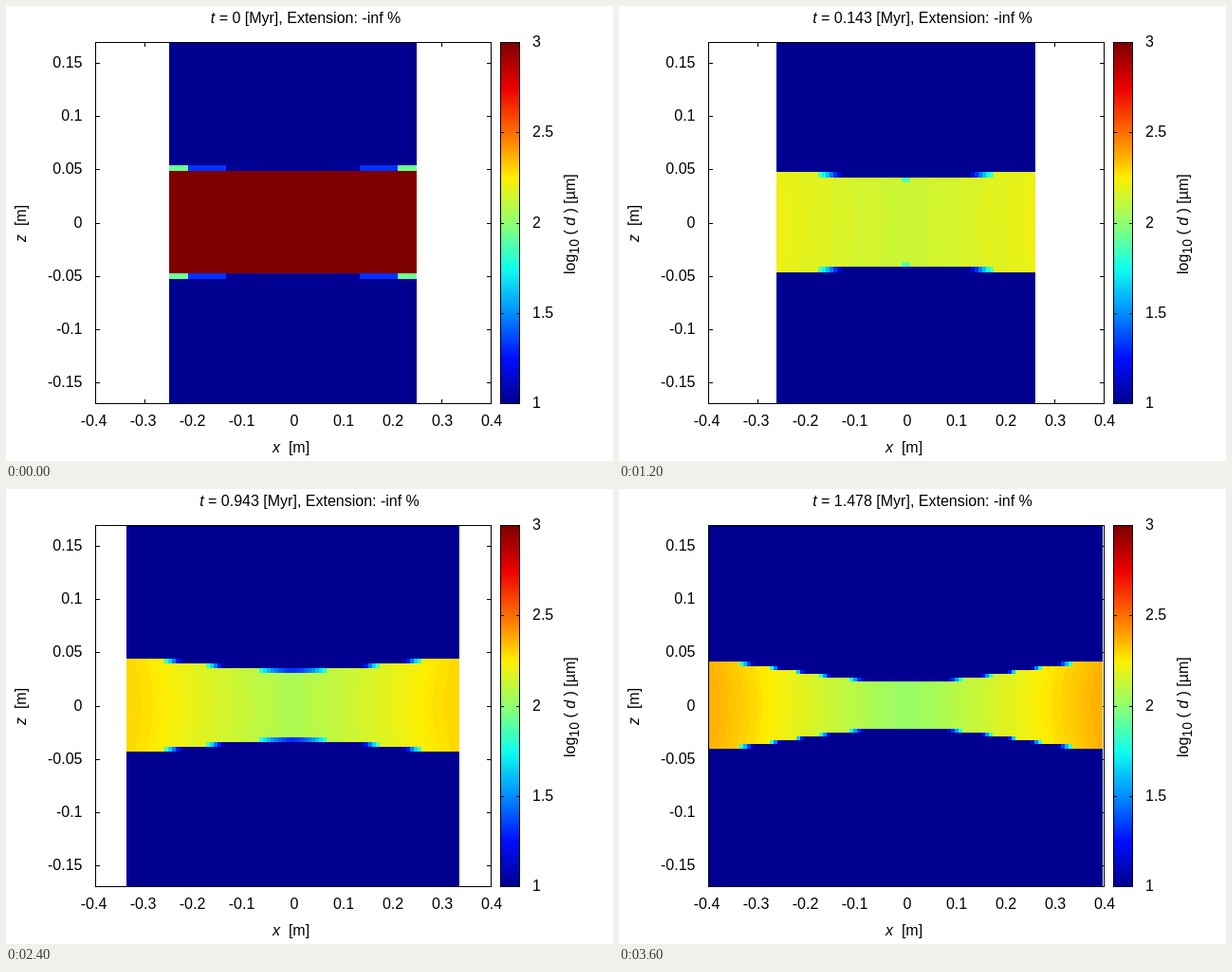
An HTML page for the animation above (4000 ms loop, 640x480 px).

```html
<!DOCTYPE html>
<html lang="en">
<head>
<meta charset="utf-8">
<title>Layer extension</title>
<style>
  html, body { margin: 0; width: 100%; height: 100%; overflow: hidden; background: #fff; }
  svg { display: block; width: 640px; height: 480px; }
  text { font: 16px "Liberation Sans", Arial, sans-serif; fill: #000; white-space: pre; }
  .it { font-style: italic; }
  .sub { font-size: 14px; }
  .line { fill: none; stroke: #000; stroke-width: 1; }
</style>
</head>
<body>
<svg viewBox="0 0 640 480">
  <g id="axes"></g>
  <g id="model" transform="translate(302.5 228)" shape-rendering="crispEdges"></g>
  <rect class="line" x="94.5" y="38.5" width="417" height="381"/>
  <g id="bar" shape-rendering="crispEdges"></g>
  <g id="barTicks"></g>
  <text id="title" y="18" text-anchor="middle"><tspan class="it">t</tspan><tspan id="clock"></tspan></text>
  <text x="281" y="471"><tspan class="it">x</tspan>&#160; [m]</text>
  <text transform="translate(21 249) rotate(-90)"><tspan class="it">z</tspan>&#160; [m]</text>
  <text transform="translate(600 283) rotate(-90)">log<tspan class="sub" dy="4">10</tspan><tspan dy="-4"> ( </tspan><tspan class="it">d</tspan> ) [µm]</text>
</svg>
<script>
const $ = id => document.getElementById(id);
const STEP_MS = 400;
const TIMES = [0, 0.002, 0.016, 0.143, 0.447, 0.715, 0.943, 1.143, 1.32, 1.478];
const HALF_WIDTH = 130.5, HALF_HEIGHT = 54, ROW = 6, COLUMN = 4;
const STRAIN_RATE = 0.3138;
const TOP = -189, BOTTOM = 191;

// Colour scale from 1 to 3, in 128 levels
const STOPS = ["000090", "000fff", "0090ff", "0fffee", "90ff70", "ffee00", "ff7000", "ee0000", "7f0000"]
  .map(hex => [0, 2, 4].map(i => parseInt(hex.slice(i, i + 2), 16)));

function color(value) {
  const level = Math.max(0, Math.min(127, Math.floor((value - 1) * 64)));
  const pos = level / 127 * 8;
  const i = Math.min(7, Math.floor(pos));
  return `rgb(${STOPS[i].map((c, k) => Math.round(c + (STOPS[i + 1][k] - c) * (pos - i)))})`;
}

const box = (x, y, w, h, fill) =>
  `<rect x="${x}" y="${y}" width="${w}" height="${h}" fill="${fill}"/>`;
const line = (x1, y1, x2, y2) => `<path class="line" d="M${x1} ${y1}L${x2} ${y2}"/>`;
const label = (x, y, anchor, str) => `<text x="${x}" y="${y}" text-anchor="${anchor}">${str}</text>`;
const crisp = v => Math.floor(v) + 0.5;

// One cell repeated in all four quadrants
function mirrored(inner, outer, low, high, fill) {
  let out = "";
  for (const x of [-outer, inner])
    for (const y of [-high, low]) out += box(x, y, outer - inner, high - low, fill);
  return out;
}

// Nested bands whose sides bow towards the centre
function bands(half, height, centre, spread) {
  let out = "", last = "";
  for (let d = half; d > 0; d -= COLUMN) {
    const fill = color(centre + spread * (d / half) ** 1.3);
    if (fill === last) continue;
    last = fill;
    const waist = d === half ? d : d - Math.min(16, d / 2);
    out += `<path fill="${fill}" d="M${-d} ${-height}Q${-waist} 0 ${-d} ${height}H${d}Q${waist} 0 ${d} ${-height}Z"/>`;
  }
  return out;
}

// Coarse cells along the undeformed layer, fading towards the centre
function rim(half, relax) {
  let out = "", outer = half;
  for (const inner of [110.5, 70.5, 37.5]) {
    const value = 1 + (0.75 + 0.18 * relax) * (outer / half) ** 6.5;
    out += mirrored(inner, outer, HALF_HEIGHT, HALF_HEIGHT + ROW, color(value));
    outer = inner;
  }
  return out;
}

// Rows eaten away by the neck; a partly eaten cell fades to the matrix colour
function neck(half, stretch, height) {
  const row = n => Math.round(height - n * ROW * stretch ** -0.75);
  const depth = 1.35 + 1.2 * (stretch - 1) + 9.5 * Math.max(0, stretch - 1.25);
  let out = "";
  for (let outer = half; outer > 0; outer -= COLUMN) {
    const inner = Math.max(0, outer - COLUMN);
    const eaten = depth * (1 - (outer / half) ** 2) ** 2;
    const n = Math.floor(eaten);
    const fade = (eaten - n - 0.4) / 0.4;
    if (n > 0) out += mirrored(inner, outer, row(n), row(0), color(1));
    if (fade > 0) out += mirrored(inner, outer, row(n + 1), row(n), color(1.9 - 0.9 * fade));
  }
  return out;
}

function drawModel(index) {
  const time = TIMES[index];
  const stretch = Math.exp(STRAIN_RATE * time);
  const half = crisp(HALF_WIDTH * stretch - 0.25);
  const height = HALF_HEIGHT * stretch ** -0.36;
  const relax = 2 ** (-time / 0.002);
  const centre = 2.14 - 0.21 * (stretch - 1) + 0.86 * relax;
  const spread = (0.05 + 0.51 * (stretch - 1)) * (1 - relax);
  const deformed = half > HALF_WIDTH;

  $("model").innerHTML = box(-half, TOP, 2 * half, BOTTOM - TOP, color(1)) +
    bands(half, Math.round(height), centre, spread) +
    (deformed ? neck(half, stretch, height) : rim(half, relax));
  $("clock").textContent = ` = ${time && time.toFixed(3)} [Myr], Extension: -inf %`;
  $("title").setAttribute("x", time ? 320 : 316);
}

function drawAxes() {
  let axes = "", bar = "", ticks = "";
  for (let i = 0; i <= 8; i++) {
    const x = crisp(94.5 + i * 417 / 8);
    axes += line(x, 419, x, 415) + line(x, 39, x, 43);
    axes += label(x + (i < 4 ? -2 : 0.5), 443, "middle", (i - 4) / 10);
  }
  for (let i = -3; i <= 3; i++) {
    const y = crisp(229 + i * 381 * 0.05 / 0.34);
    axes += line(95, y, 99, y) + line(511, y, 507, y);
    axes += label(80.5, y + 4.5, "end", -i / 20 || 0);
  }
  for (let i = 0; i < 128; i++) {
    const y = 419 - (i + 1) * 381 / 128;
    bar += box(521, y, 21, 381 / 128 + 0.5, color(1 + (i + 0.5) / 64));
  }
  for (let i = 0; i <= 4; i++) {
    const y = Math.round(419 - i * 95.25) + 0.5;
    ticks += line(521, y, 525, y) + line(538, y, 542, y);
    ticks += label(555, y + 4.5, "start", 1 + i / 2);
  }
  $("axes").innerHTML = axes;
  $("bar").innerHTML = bar;
  $("barTicks").innerHTML = ticks + '<rect class="line" x="521.5" y="38.5" width="20" height="381"/>';
}

let shown = -1;
function update() {
  const index = Math.floor(performance.now() / STEP_MS) % TIMES.length;
  if (index !== shown) drawModel(shown = index);
  requestAnimationFrame(update);
}

drawAxes();
update();
</script>
</body>
</html>
```
